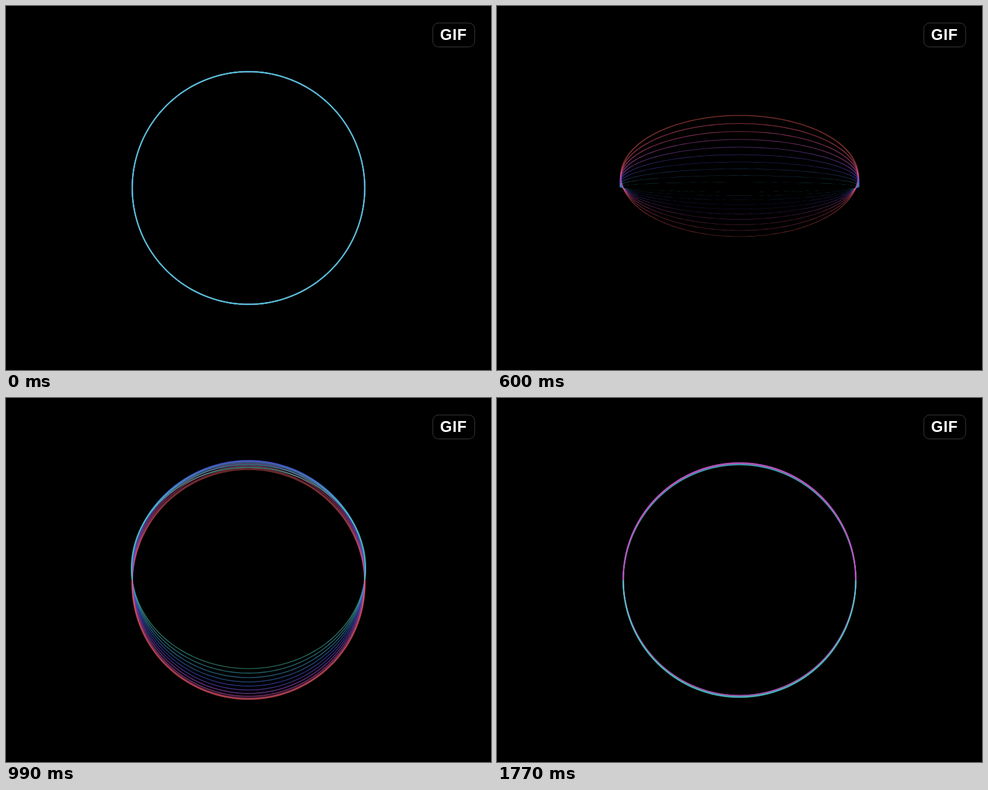
These frames come from a looping animation (800x600 px, 1800 ms). An HTML page:

```html
<!DOCTYPE html>
<html lang="en">
<head>
<meta charset="utf-8">
<title>Spinning rings</title>
<style>
  html, body { margin: 0; width: 100%; height: 100%; overflow: hidden; background: #000; }
  svg { display: block; width: 100vw; height: 100vh; }
  text { font: bold 25.2px "Liberation Sans", Arial, sans-serif; letter-spacing: 0.8px; fill: #fff; }
</style>
</head>
<body>
<svg viewBox="0 0 800 600">
  <g id="rings"></g>
  <rect x="704" y="28" width="69" height="39.5" rx="9.5" fill="#000" stroke="#3c3c3c"/>
  <text x="716" y="55.6">GIF</text>
</svg>
<script>
const LOOP = 1800, STEP = 30;
const CX = 400, CY = 300, RADIUS = 191.8, WIDTH = 1.9, CAMERA = 838;
const OPACITY = 0.5, SEGMENTS = 80;
const COLORS = ['#eb5a55', '#e65573', '#e15596', '#cd55be', '#a055dc', '#6e55e1',
                '#4b5ae1', '#4182e0', '#46afe4', '#4bcde0', '#55dcbe'];
const BOUNCE = { amp: 0.062, freq: 2.25, decay: 2.4 };

// Half a turn at constant speed, then a decaying wobble driven by that speed.
function angleAt(index, ms) {
  const duration = 900 + 30 * index;
  if (ms <= duration) return Math.PI * ms / duration;
  const late = (ms - duration) / 1000;
  const speed = Math.PI / (duration / 1000);
  return Math.PI + speed * BOUNCE.amp *
    Math.sin(2 * Math.PI * BOUNCE.freq * late) * Math.exp(-BOUNCE.decay * late);
}

// Tilt of the lower half: how flat it looks and how far it leans to the viewer.
function tiltOf(angle) {
  const facing = Math.cos(angle) < 0 ? -1 : 1;
  return { flat: Math.abs(Math.cos(angle)), near: Math.sin(angle) * facing };
}

// One side of the circle on screen; side is 1 for the lower half, -1 for the upper.
function arc(radius, { flat, near }, side) {
  return Array.from({ length: SEGMENTS + 1 }, (_, k) => {
    const phi = Math.PI * k / SEGMENTS;
    const v = side * radius * Math.sin(phi);
    const scale = CAMERA / (CAMERA - v * near);
    const x = CX + radius * Math.cos(phi) * scale;
    const y = CY + v * flat * scale;
    return x.toFixed(3) + ' ' + y.toFixed(3);
  });
}

function bandPath(tilt, side) {
  const outer = arc(RADIUS + WIDTH / 2, tilt, side);
  const inner = arc(RADIUS - WIDTH / 2, tilt, side).reverse();
  return 'M' + outer.concat(inner).join('L') + 'Z';
}

const group = document.getElementById('rings');
group.setAttribute('fill-opacity', OPACITY);
const makePaths = () => COLORS.map(() =>
  group.appendChild(document.createElementNS('http://www.w3.org/2000/svg', 'path')));
const halves = [{ side: -1, paths: makePaths() }, { side: 1, paths: makePaths() }];

function draw(ms) {
  const rings = COLORS.map((color, i) => ({ color, tilt: tiltOf(angleAt(i, ms)) }));
  for (const { side, paths } of halves) {
    // Far rings first, so that the nearest one covers the rest.
    const ordered = [...rings].sort((a, b) => side * (a.tilt.near - b.tilt.near));
    ordered.forEach(({ color, tilt }, i) => {
      paths[i].setAttribute('d', bandPath(tilt, side));
      paths[i].setAttribute('fill', color);
    });
  }
}

const start = performance.now();
function tick() {
  const ms = (performance.now() - start) % LOOP;
  draw(Math.floor(ms / STEP) * STEP);
  requestAnimationFrame(tick);
}
tick();
</script>
</body>
</html>
```
